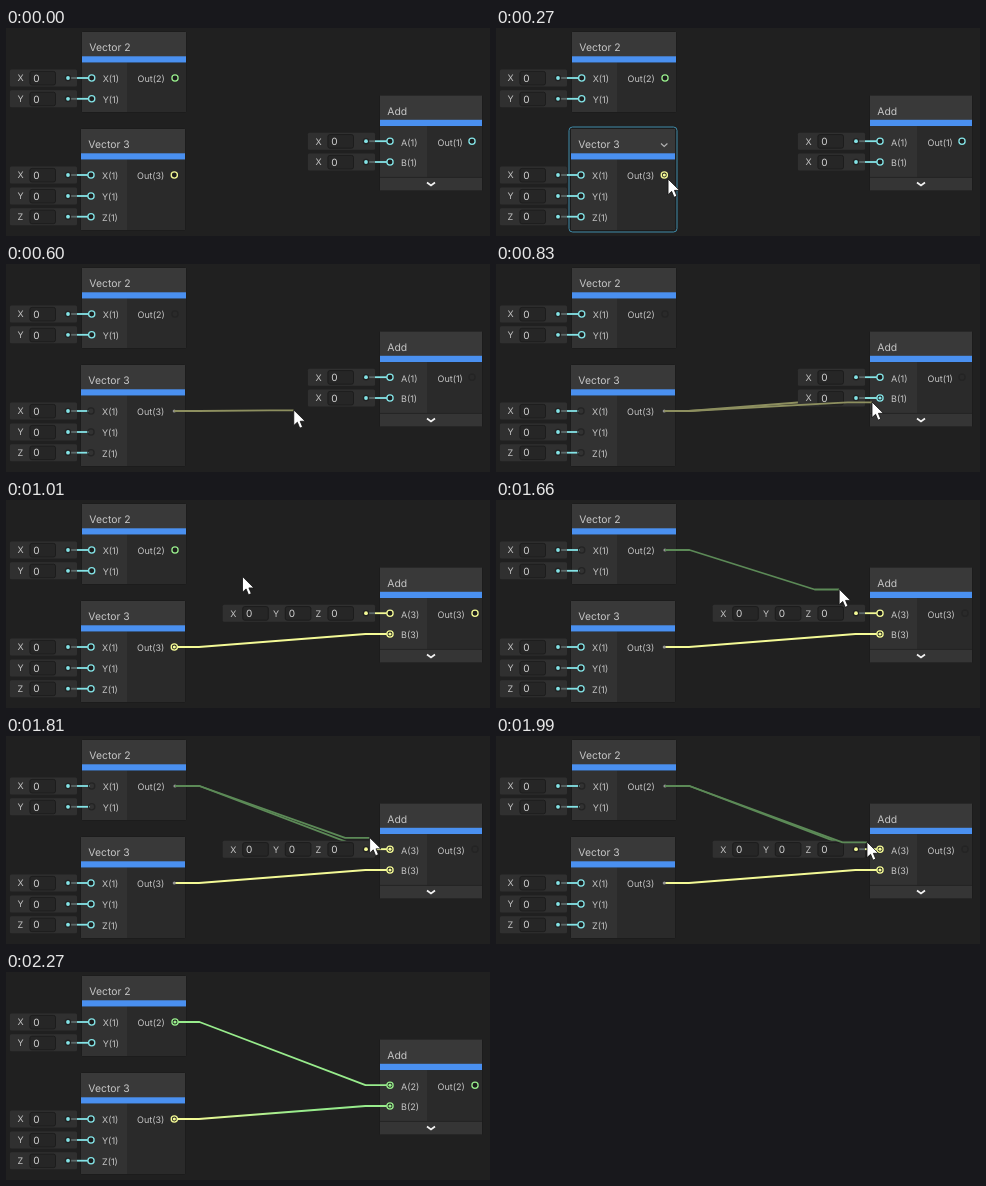
Animation, 484 px wide and 208 px high, one loop 2.7 s. Source, as an HTML page:

```html
<!DOCTYPE html>
<html lang="en">
<head>
<meta charset="utf-8">
<title>Node graph</title>
<style>
  html, body { margin: 0; width: 100%; height: 100%; overflow: hidden; background: #202020; }
  svg { display: block; width: 484px; height: 208px; }
  text { font-family: Inter, Roboto, sans-serif; fill: #c6c6c6; text-rendering: geometricPrecision; }
  .title { font-size: 10.4px; }
  .label { font-size: 9px; }
  .value { font-size: 10px; fill: #d2d2d2; }
  .wire { fill: none; stroke-width: 1.8; stroke-linejoin: round; }
</style>
</head>
<body>
<svg id="stage" viewBox="0 0 484 208"></svg>
<script>
(() => {
const LOOP = 2700;
const CYAN = '#84e4e7', GREEN = '#98ec8c', YELLOW = '#f4fa96';
const TYPE = { 1: CYAN, 2: GREEN, 3: YELLOW };
const DROP_B = 930, DROP_A = 2090;

// [time, x, y, easing towards this point]
const PATH = [
  [40, 206, 203], [280, 172, 151, 'out'], [340, 169, 147], [420, 169, 147],
  [600, 287, 146], [830, 376, 138, 'out'], [930, 376, 138],
  [1110, 176, 50, 'out'], [1350, 169, 48, 'out'], [1530, 169, 48],
  [1660, 343, 89], [1970, 371, 106, 'out'], [2090, 371, 106],
  [2270, 364, -16, 'in']
];
const EASE = { out: p => 1 - (1 - p) ** 2, in: p => p * p };

const stage = document.getElementById('stage');

function add(parent, tag, attrs, text) {
  const el = document.createElementNS('http://www.w3.org/2000/svg', tag);
  set(el, attrs);
  if (text !== undefined) el.textContent = text;
  return parent.appendChild(el);
}
function set(el, attrs) {
  for (const k in attrs) el.setAttribute(k, attrs[k]);
}
const show = (el, on) => el.setAttribute('visibility', on ? 'visible' : 'hidden');
const rect = (parent, x, y, width, height, fill, more) =>
  add(parent, 'rect', { x, y, width, height, fill, ...more });
const label = (parent, x, y, cls, text) => add(parent, 'text', { x, y, class: cls }, text);

const [nodes, wires, inputs, ports, front] = Array.from({ length: 5 }, () => add(stage, 'g', {}));

function makeNode(x, y, w, h, split, title, footer = 0) {
  rect(nodes, x - .5, y - .5, w + 1, h + 1, '#191919', { rx: 1.5 });
  rect(nodes, x, y, w, 25, '#393939');
  rect(nodes, x, y + 24.3, w, 6.4, '#4a90f0');
  rect(nodes, x, y + 30.7, split - x, h - 30.7 - footer, '#323232');
  rect(nodes, split, y + 30.7, x + w - split, h - 30.7 - footer, '#2a2a2a');
  if (footer) {
    rect(nodes, x, y + h - footer, w, footer, '#353535');
    rect(nodes, x, y + h - footer - .6, w, .8, '#232323');
    add(nodes, 'path', {
      d: `M${x + w / 2 - 4} ${y + h - 8}l4 3 4-3`, fill: 'none', stroke: '#f2f2f2', 'stroke-width': 1.7
    });
  }
  label(nodes, x + 7.3, y + 19.2, 'title', title);
  const hover = add(nodes, 'g', { fill: 'none' });
  add(hover, 'rect', { x: x - 2, y: y - 2, width: w + 4, height: h + 4, rx: 3.5, stroke: '#3f8aa8' });
  add(hover, 'path', { d: `M${x + w - 14} ${y + 14.5}l3.2 3 3.2-3`, stroke: '#b4b4b4', 'stroke-width': 1.1 });
  return { hover, hit: (px, py) => px >= x && px <= x + w && py >= y && py <= y + h };
}

// Modes: open ring, full ring with a dot, a lone dot, or off.
function makePort(x, y) {
  const ring = add(ports, 'circle', { cx: x, cy: y, r: 3.1, 'stroke-width': 1.3 });
  const dot = add(ports, 'circle', { cx: x, cy: y, r: 1.6 });
  return (mode, color = CYAN, cx = x) => {
    const off = mode === 'off' || mode === 'dot';
    set(ring, { cx, stroke: off ? '#242424' : color, fill: off ? 'none' : '#1c1c1c' });
    set(dot, { cx, fill: mode === 'dot' ? '#929292' : color });
    show(ring, mode !== 'dot');
    show(dot, mode === 'full' || mode === 'dot');
  };
}

// Inline value box, ending at `right`, wired to a port at `px`.
function makeInput(right, y, px, names, color = CYAN) {
  const g = add(inputs, 'g', {});
  const w = 24.5 + names.length * 42.6, x = right - w;
  rect(g, x, y - 8.5, w, 17, '#303030', { rx: 1.5 });
  [...names].forEach((name, i) => {
    const fx = x + 20 + i * 42.6;
    label(g, fx - 12.4, y + 3.4, 'label', name);
    rect(g, fx, y - 6.6, 25.6, 13.6, '#262626', { rx: 2, stroke: '#1b1b1b', 'stroke-width': .9 });
    label(g, fx + 3.4, y + 3.7, 'value', '0');
  });
  add(g, 'path', { d: `M${right - 9} ${y}H${right}`, class: 'wire', stroke: '#5c6868' });
  add(g, 'path', { d: `M${right} ${y}H${px - 2}`, class: 'wire', stroke: color });
  add(g, 'circle', { cx: right - 9, cy: y, r: 3.2, fill: '#222' });
  add(g, 'circle', { cx: right - 9, cy: y, r: 1.9, fill: color });
  return g;
}

const wire = (parent, stroke) => add(parent, 'path', { class: 'wire', stroke });
function route(x1, y1, x2, y2) {
  const lead = Math.max(0, Math.min(24.5, (x2 - x1) / 2));
  return `M${x1} ${y1}H${x1 + lead}L${x2 - lead} ${y2}H${x2}`;
}

const vec2 = makeNode(76, 4, 104, 80, 121, 'Vector 2');
const vec3 = makeNode(75, 101, 104, 101, 121, 'Vector 3');
const sum = makeNode(374, 67.5, 102, 95, 421, 'Add', 13);

function inputRow(name, y, px) {
  label(nodes, px + 11, y + 4.4, 'label', name + '(1)');
  makeInput(71, y, px, name);
  return makePort(px, y);
}
const in2 = [inputRow('X', 50, 85.7), inputRow('Y', 70.8, 85.7)];
const in3 = [inputRow('X', 147, 85), inputRow('Y', 168, 85), inputRow('Z', 188.7, 85)];
label(nodes, 131.5, 54.4, 'label', 'Out(2)');
label(nodes, 131, 151.4, 'label', 'Out(3)');
const out2 = makePort(169, 50), out3 = makePort(168.3, 147);

const textA = label(nodes, 395, 117.6, 'label', '');
const textB = label(nodes, 395, 138.4, 'label', '');
const textOut = label(nodes, 431.5, 117.6, 'label', '');
const portA = makePort(384, 113.2), portB = makePort(384, 134);
const outSum = makePort(469, 113.2);

const boxA1 = makeInput(369, 113.2, 384, 'X');
const boxB1 = makeInput(369, 134, 384, 'X');
const boxA3 = makeInput(369, 113.2, 384, 'XYZ', YELLOW);

const fade = add(stage, 'linearGradient', { id: 'fade', gradientUnits: 'userSpaceOnUse', x1: 185, x2: 290, y1: 0, y2: 0 });
add(fade, 'stop', { offset: 0, 'stop-color': YELLOW });
const fadeEnd = add(fade, 'stop', { offset: 1 });

const linkB = wire(wires, 'url(#fade)'), linkA = wire(wires, GREEN);
const ghost = wire(wires, 'none'), dragged = wire(front, 'none');
set(linkA, { d: route(169, 50, 384, 113.2) });
set(linkB, { d: route(168.3, 147, 384, 134) });

const cursor = add(front, 'path', {
  d: 'M0 0V15.6L3.6 12.3 6 18.2 8.8 17 6.4 11.3H11.4Z',
  fill: '#fff', stroke: '#111', 'stroke-width': .8
});

function pointer(t) {
  const i = PATH.findIndex(k => k[0] > t);
  if (i < 1) return null;
  const [t0, x0, y0] = PATH[i - 1], [t1, x1, y1, ease] = PATH[i];
  let p = (t - t0) / (t1 - t0);
  if (ease) p = EASE[ease](p);
  return [x0 + (x1 - x0) * p, y0 + (y1 - y0) * p];
}

function draw(t) {
  const at = pointer(t), [x, y] = at || [-99, -99];
  const drag3 = t >= 420 && t < DROP_B, drag2 = t >= 1530 && t < DROP_A;
  const dragging = drag3 || drag2;
  const joinedB = t >= DROP_B, joinedA = t >= DROP_A;
  const size = joinedA ? 2 : joinedB ? 3 : 1, color = TYPE[size];

  show(cursor, at);
  set(cursor, { transform: `translate(${x} ${y})` });
  for (const n of [vec2, vec3, sum]) show(n.hover, !dragging && n.hit(x, y));

  textA.textContent = `A(${size})`;
  textB.textContent = `B(${size})`;
  textOut.textContent = `Out(${size})`;
  show(boxA1, !joinedB);
  show(boxB1, !joinedB);
  show(boxA3, joinedB && !joinedA);
  show(linkA, joinedA);
  show(linkB, joinedB);
  set(fadeEnd, { 'stop-color': joinedA ? GREEN : YELLOW });

  const near = (px, py) => Math.hypot(x - px, y - py) < 7;
  const overA = drag2 && x > 362, overB = drag3 && x > 366;
  in2.forEach(port => port(drag2 ? 'off' : 'open'));
  in3.forEach(port => port(drag3 ? 'off' : 'open'));
  out2(drag2 ? 'dot' : drag3 ? 'off' : joinedA || near(169, 50) ? 'full' : 'open', GREEN);
  out3(dragging ? 'dot' : joinedB || near(168, 147) ? 'full' : 'open', YELLOW);
  portA(joinedA || overA ? 'full' : 'open', color);
  portB(joinedB || overB ? 'full' : 'open', color);
  outSum(dragging ? 'off' : 'open', color, size === 1 ? 466 : 469);

  show(dragged, dragging);
  show(ghost, overA || overB);
  if (dragging) {
    const from = drag3 ? [168.3, 147] : [169, 50];
    const stroke = drag3 ? '#8d8f5f' : '#5c8a57';
    set(dragged, { d: route(...from, x, y + .4), stroke });
    set(ghost, { d: route(...from, 384, drag3 ? 134 : 113.2), stroke });
  }
}

const start = performance.now();
function tick() {
  draw((performance.now() - start) % LOOP);
  requestAnimationFrame(tick);
}
tick();
})();
</script>
</body>
</html>
```
